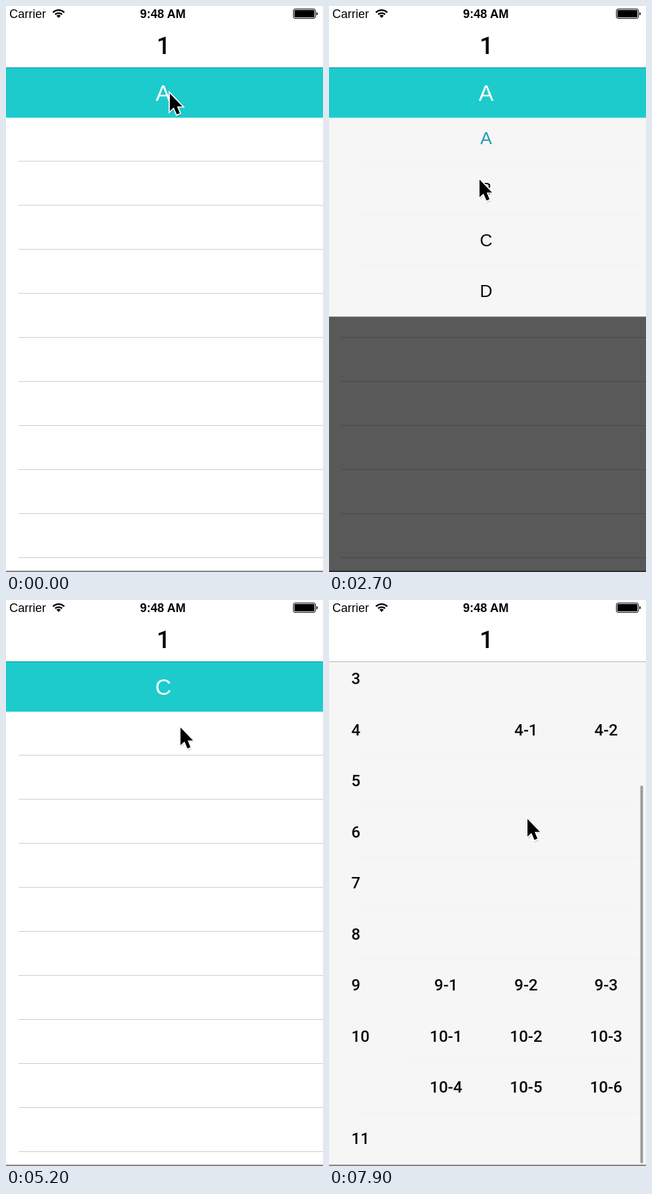
These frames come from a looping animation (476x848 px, 8000 ms). An HTML page:

```html
<!DOCTYPE html>
<html lang="en">
<head>
<meta charset="utf-8">
<title>Dropdown menu</title>
<style>
html, body { margin: 0; width: 100%; height: 100%; overflow: hidden; background: #fff; }
svg { display: block; font-family: "Liberation Sans", Arial, sans-serif; }
.mid { text-anchor: middle; }
.num { font-family: Roboto, sans-serif; font-weight: 500; }
.anim { animation: 8s linear infinite; }

#dim { animation-name: dim; }
#menu { animation-name: menu; }
#listDim, #listEdge { animation-name: listDim; }
#list { animation-name: list; }
#rows { animation-name: scroll; }
#bar { animation-name: bar; }
#cursor { animation-name: move; animation-timing-function: ease-in-out; }
#ring { animation-name: press; }
.pick { opacity: 0; animation: 8s step-end infinite; }
.pickA { animation-name: pickA; }
.pickB { animation-name: pickB; }
.pickC { animation-name: pickC; }
.itemA { animation: itemA 8s step-end infinite; }
.itemB { animation: itemB 8s step-end infinite; }
.itemC { animation: itemC 8s step-end infinite; }

@keyframes dim {
  0%, 3.5%, 21.4%, 27%, 43.5%, 47.5%, 62.5%, 100% { opacity: 0; }
  8%, 16.75%, 31.5%, 38.75%, 52%, 58.25% { opacity: 1; }
}
@keyframes menu {
  0%, 3.5%, 21%, 27%, 43.5%, 47.5%, 62.5%, 100% { transform: translateY(-299px); animation-timing-function: ease-out; }
  8%, 16.75%, 31.5%, 38.75%, 52%, 58.25% { transform: none; animation-timing-function: ease-in-out; }
}
@keyframes listDim {
  0%, 71.5% { opacity: 0; }
  77%, 100% { opacity: 1; }
}
@keyframes list {
  0%, 71.5% { transform: translateY(-754px); animation-timing-function: ease-out; }
  78%, 100% { transform: none; }
}
@keyframes scroll {
  0%, 85.5% { transform: none; animation-timing-function: ease-in; }
  90% { transform: translateY(-132px); animation-timing-function: cubic-bezier(.15, .6, .4, 1); }
  98%, 100% { transform: translateY(-232px); }
}
@keyframes bar {
  0%, 83.75% { opacity: 0; transform: none; }
  84.9% { opacity: 1; }
  85.5% { transform: none; animation-timing-function: ease-in; }
  90% { transform: translateY(99px); animation-timing-function: cubic-bezier(.15, .6, .4, 1); }
  98%, 100% { opacity: 1; transform: translateY(174px); }
}
@keyframes move {
  0%, 3.5% { transform: translate(246px, 131px); }
  13.75%, 17% { transform: translate(250px, 560px); }
  21.25%, 21.75% { transform: translate(251.5px, 403.5px); }
  25%, 27.5% { transform: translate(246px, 121px); }
  32.5%, 37% { transform: translate(226px, 260px); }
  44.5%, 48.5% { transform: translate(248px, 123px); }
  54.5%, 58% { transform: translate(322px, 332px); }
  65%, 65.6% { transform: translate(262px, 191px); }
  69%, 71.5% { transform: translate(236px, 52px); }
  82%, 85.5% { transform: translate(252px, 432px); animation-timing-function: ease-in; }
  90% { transform: translate(288px, 300px); }
  94%, 100% { transform: translate(298px, 328px); }
}
@keyframes press {
  0%, 1.1%, 3.4%, 14.9%, 17.1%, 25.4%, 27.6%, 34.9%, 37.1%, 46.1%, 48.4%, 55.6%, 57.9%, 69.3%, 71.6%, 84.4%, 90.6%, 100% { opacity: 0; }
  1.3%, 3%, 15.1%, 16.7%, 25.6%, 27.2%, 35.1%, 36.7%, 46.3%, 48%, 55.8%, 57.5%, 69.5%, 71.2%, 84.9%, 90% { opacity: 1; }
}
@keyframes pickA { 0% { opacity: 1; } 36.25%, 100% { opacity: 0; } }
@keyframes pickB { 0% { opacity: 0; } 36.25% { opacity: 1; } 57.5%, 100% { opacity: 0; } }
@keyframes pickC { 0% { opacity: 0; } 57.5%, 100% { opacity: 1; } }
@keyframes itemA { 0% { fill: #2399b4; } 36.25%, 100% { fill: #0b0b10; } }
@keyframes itemB { 0% { fill: #0b0b10; } 36.25% { fill: #2399b4; } 57.5%, 100% { fill: #0b0b10; } }
@keyframes itemC { 0% { fill: #0b0b10; } 57.5%, 100% { fill: #2399b4; } }
</style>
</head>
<body>
<svg width="476" height="848" viewBox="0 0 476 848">
  <rect width="476" height="848" fill="#fff"/>
  <g id="lines" fill="#cdcdcd"></g>
  <rect y="846" width="476" height="2" fill="#858585"/>

  <svg y="167" width="476" height="681" overflow="hidden">
    <rect id="dim" class="anim" width="476" height="681" fill="#000" fill-opacity=".65"/>
    <g id="menu" class="anim">
      <rect width="476" height="298.4" fill="#f6f6f6"/>
    </g>
  </svg>

  <rect y="93" width="476" height="74.4" fill="#1dcbcd"/>
  <g class="mid" font-size="33.5" fill="#fff">
    <text class="pick pickA" x="236" y="142">A</text>
    <text class="pick pickB" x="236" y="142">B</text>
    <text class="pick pickC" x="236" y="142">C</text>
  </g>
  <rect y="92" width="476" height="1" fill="#159294"/>

  <svg y="93" width="476" height="753" overflow="hidden">
    <rect id="listDim" class="anim" width="476" height="753" fill="#000" fill-opacity=".65"/>
    <g id="list" class="anim">
      <rect width="476" height="753" fill="#f6f6f6"/>
      <svg width="476" height="753" overflow="hidden">
        <g id="rows" class="anim num" font-size="24"></g>
      </svg>
      <rect id="bar" class="anim" x="467.5" y="11" width="4" height="566" rx="2" fill="#9b9b9b"/>
    </g>
  </svg>
  <rect id="listEdge" class="anim" y="92" width="476" height="1" fill="#b5b8b8"/>

  <text x="5" y="18" font-size="18">Carrier</text>
  <g fill="none" stroke="#000" stroke-width="2.4">
    <path d="M70.5 9.6a12.2 12.2 0 0 1 17 0M73.8 12.7a7.6 7.6 0 0 1 10.4 0"/>
    <path d="M79 18l-3.2-3.4a4.6 4.6 0 0 1 6.4 0z" fill="#000" stroke="none"/>
  </g>
  <text class="mid" x="235.5" y="18" font-size="18" font-weight="bold">9:48 AM</text>
  <rect x="431.5" y="4.5" width="33" height="14" rx="2.5" fill="none" stroke="#000"/>
  <rect x="433" y="6" width="30" height="11" rx="1"/>
  <path d="M466 9q2 .5 2 2.5t-2 2.5z"/>
  <text class="mid num" x="236.5" y="72" font-size="36">1</text>

  <g id="cursor" class="anim">
    <circle id="ring" class="anim" cy="2" r="45.3" fill="none" stroke="#000" stroke-width="2.8"/>
    <path d="M1 4V30L7 24.5 11.5 35 17 33 12.5 22H20z" fill="#000" opacity=".13"/>
    <path d="M0 0V26.5L6 21 10.5 31.5 15 29.5 10.8 19.5H18.8z" fill="#000" stroke="#fff" stroke-width="3.4" paint-order="stroke"/>
  </g>
</svg>
<script>
const PITCH = 76.5;
const get = id => document.getElementById(id);

function add(parent, tag, attrs, label = "") {
  const el = document.createElementNS("http://www.w3.org/2000/svg", tag);
  for (const key in attrs) el.setAttribute(key, attrs[key]);
  el.textContent = label;
  parent.append(el);
}

function divider(parent, x, y) {
  add(parent, "rect", { x, y, width: 476 - x, height: 1, fill: "#f1f1f1" });
}

for (let y = 232; y < 846; y += 66) {
  add(get("lines"), "rect", { x: 19, y, width: 457, height: 1 });
}

[..."ABCD"].forEach((letter, i) => {
  add(get("menu"), "text", { class: "mid item" + letter, x: 236, y: 39.5 + i * PITCH, "font-size": 26, fill: "#0b0b10" }, letter);
  if (i < 3) divider(get("menu"), 44, 68 + i * PITCH);
});

// Each row: heading, then three columns
const rows = [
  "1", "2 2-1 2-2 2-3", "_ 2-4", "3", "4 _ 4-1 4-2", "5", "6", "7", "8",
  "9 9-1 9-2 9-3", "10 10-1 10-2 10-3", "_ 10-4 10-5 10-6", "11"
];
rows.forEach((row, i) => {
  const nested = rows[i + 1]?.startsWith("_");
  divider(get("rows"), nested ? 114 : 44, 65 + i * PITCH);
  row.split(" ").forEach((label, col) => {
    if (label === "_") return;
    add(get("rows"), "text", {
      class: col ? "mid" : "",
      x: col ? 55.5 + col * 120.2 : 33.5,
      y: 35.5 + i * PITCH,
      fill: i ? "#0b0b0b" : "#27a0b8"
    }, label);
  });
});
</script>
</body>
</html>
```
